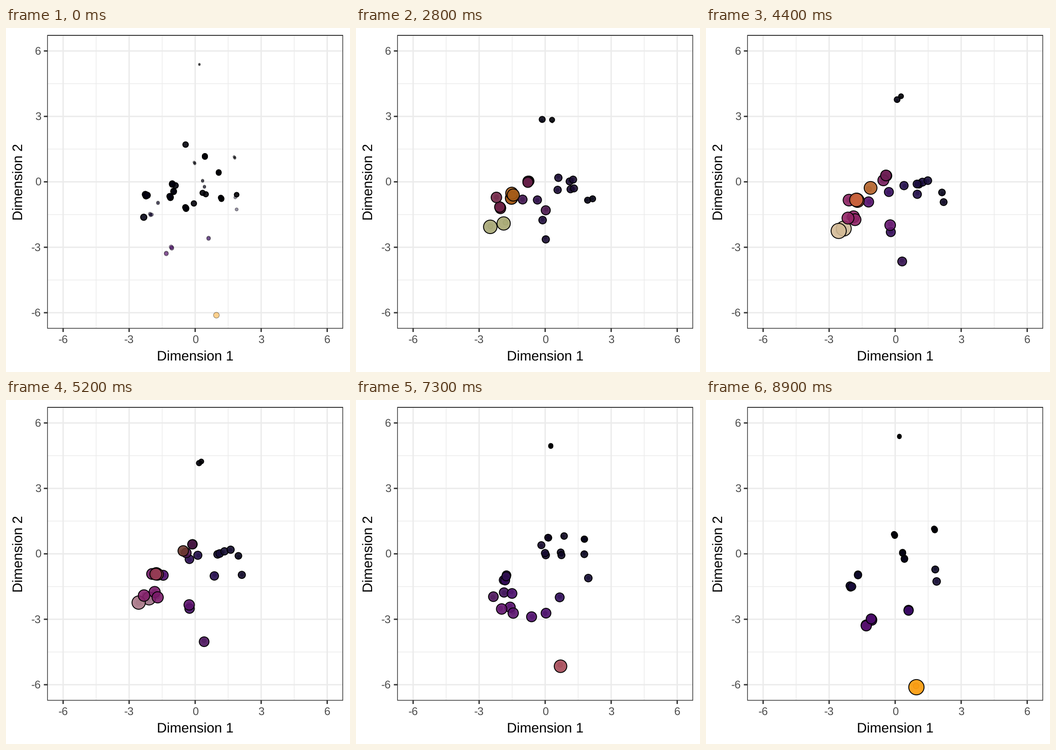
Recreate the animation shown at these times as a matplotlib script. Size 748x748 px, loop 10000 ms.

```python
import numpy as np
import matplotlib
import matplotlib.pyplot as plt
from matplotlib.animation import FuncAnimation

SIZE, DPI = 748, 100
PX = 72 / DPI                    # points per pixel
STEPS, PAUSE, FRAMES = 79, 10, 100
STROKE = 1.9
GOLDEN = np.pi * (3 - 5 ** 0.5)

plt.rcParams["font.family"] = "Liberation Sans"
plt.rcParams["text.hinting"] = "none"

# The points travel in straight lines between the hubs of four stages.
# Each route names the hub of every point, from the back dot to the front.
HUBS_1 = [(390, 253), (432, 278), (462, 313), (361, 338), (368, 342),
          (364, 354), (357, 367), (304, 363), (299, 411), (391, 391),
          (408, 381), (427, 358), (434, 361), (468, 370), (501, 362)]
ROUTE_1 = "jijkmnhhhhgggdjedffbcclnonab"

# Here the third number is the level, as it follows no simple slope
HUBS_2 = [(288, 440, 1), (422, 490, .34), (404, 434, .38), (402, 412, .55),
          (465, 341, .34), (318, 403, .66), (304, 370, .67), (364, 375, .51),
          (329, 370, .86), (331, 366, .86), (396, 366, .44), (379, 328, .64),
          (443, 347, .36), (476, 336, .34), (520, 375, .23), (411, 173, .2),
          (423, 162, .1)]
ROUTE_2 = "aabcdefffghiiikllljmenmnoopq"

HUBS_3 = [(326, 425), (288, 439), (436, 549), (395, 466), (444, 410),
          (337, 445), (326, 383), (400, 332), (423, 303), (456, 330),
          (496, 315), (507, 382), (425, 112)]
ROUTE_3 = "abcddeafbggggghihiihjjkkklmm"

HUBS_4 = [(348, 489), (360, 477), (457, 624), (440, 456), (314, 405),
          (330, 379), (431, 344), (410, 293), (427, 331), (497, 281),
          (498, 368), (501, 394), (420, 78)]
ROUTE_4 = "abcbddeaeebfefghijhhigjjklmm"


def depth(y):
    return (y - y.min()) / np.ptp(y)


def stage(hubs, route, level=None):
    """Rows of x, y, level; dots sharing a hub fan out slightly."""
    hubs = np.array(hubs, float)
    x, y = hubs[:, 0], hubs[:, 1]
    levels = level(x, y) if level else hubs[:, 2]
    rows = []
    for n, name in enumerate(route):
        i, k = ord(name) - ord("a"), route[:n].count(name)
        angle = np.pi / 2 + (k - 1) * GOLDEN
        gap = 1.5 * k ** 0.5
        rows.append((x[i] + gap * np.cos(angle), y[i] + gap * np.sin(angle),
                     levels[i]))
    return rows


STAGES = np.array([
    stage(HUBS_1, ROUTE_1, lambda x, y: 0.2 - 0.0006 * (x - 300)),
    stage(HUBS_2, ROUTE_2),
    stage(HUBS_3, ROUTE_3,
          lambda x, y: 0.01 + 0.48 * depth(y) + 0.17 * (500 - x) / 200),
    stage(HUBS_4, ROUTE_4, lambda x, y: 0.01 + 0.87 * depth(y) ** 2)])
COUNT = STAGES.shape[1]

TO_XYZ = np.array([[0.4124, 0.3576, 0.1805],
                   [0.2126, 0.7152, 0.0722],
                   [0.0193, 0.1192, 0.9505]])
WHITE = TO_XYZ.sum(axis=1)


def rgb_to_lab(rgb):
    lin = np.where(rgb > 0.04045, ((rgb + 0.055) / 1.055) ** 2.4, rgb / 12.92)
    t = lin @ TO_XYZ.T / WHITE
    f = np.where(t > 0.008856, np.cbrt(t), 7.787 * t + 16 / 116)
    x, y, z = np.moveaxis(f, -1, 0)
    return np.stack([116 * y - 16, 500 * (x - y), 200 * (y - z)], axis=-1)


def lab_to_rgb(lab):
    l, a, b = np.moveaxis(lab, -1, 0)
    y = (l + 16) / 116
    f = np.stack([y + a / 500, y, y - b / 200], axis=-1)
    t = np.where(f > 0.2069, f ** 3, (f - 16 / 116) / 7.787)
    lin = np.clip((t * WHITE) @ np.linalg.inv(TO_XYZ).T, 0, 1)
    return np.where(lin > 0.0031308, 1.055 * lin ** (1 / 2.4) - 0.055,
                    12.92 * lin)


inferno = matplotlib.colormaps["inferno"]
LABS = rgb_to_lab(inferno(np.clip(STAGES[..., 2], 0, 1) ** 2)[..., :3])


def pose(step):
    """Positions, radii and fill colours at a step."""
    pos = step / STEPS * (len(STAGES) - 1)
    i = min(int(pos), len(STAGES) - 2)
    t = pos - i
    dots = STAGES[i] * (1 - t) + STAGES[i + 1] * t
    rgb = lab_to_rgb(LABS[i] * (1 - t) + LABS[i + 1] * t)
    return dots[:, :2], 3.9 + 14.5 * dots[:, 2], np.clip(rgb, 0, 1)


def with_alpha(rgb, alpha):
    return np.column_stack([rgb, np.full(len(rgb), alpha)])


fig = plt.figure(figsize=(SIZE / DPI, SIZE / DPI), dpi=DPI, facecolor="white")
ax = fig.add_axes([0, 0, 1, 1])
ax.set_xlim(-0.5, SIZE - 0.5)     # whole numbers are pixel centres
ax.set_ylim(SIZE - 0.5, -0.5)
ax.axis("off")

LEFT, RIGHT, TOP, BOTTOM = 89.8, 731.8, 15.5, 652.5
INK, GRID, GREY = "#333333", "#ebebeb", "#4d4d4d"


def px(x):
    return 410.8 + 47.85 * x


def py(y):
    return 334 - 47.43 * y


def line(xs, ys, color, width, z):
    ax.plot(xs, ys, color=color, lw=width * PX, zorder=z, snap=False,
            solid_capstyle="butt", solid_joinstyle="miter")


def label(x, y, text, size, color, ha="center", **kw):
    ax.text(x, y, text, fontsize=size * PX, color=color, ha=ha,
            va="baseline", **kw)


for v in np.arange(-6, 6.1, 1.5):
    major = v % 3 == 0
    width, z = (2.9, 2) if major else (1.45, 1)
    line([px(v)] * 2, [TOP, BOTTOM], GRID, width, z)
    line([LEFT, RIGHT], [py(v)] * 2, GRID, width, z)
    if major:
        line([px(v)] * 2, [BOTTOM, BOTTOM + 8], INK, width, z)
        line([LEFT - 8, LEFT], [py(v)] * 2, INK, width, z)
        label(px(v), 685, f"{v:.0f}", 24, GREY)
        label(75.5, py(v) + 8.5, f"{v:.0f}", 24, GREY, ha="right")
line([LEFT, RIGHT, RIGHT, LEFT, LEFT, RIGHT],
     [TOP, TOP, BOTTOM, BOTTOM, TOP, TOP], INK, 1.5, 5)
label(410.5, 723.5, "Dimension 1", 30, "black")
label(36.5, 334, "Dimension 2", 30, "black", rotation=90,
      rotation_mode="anchor")

dots = ax.scatter(np.zeros(2 * COUNT), np.zeros(2 * COUNT), zorder=4)
dots.set_linewidths([1.0 * PX] * COUNT + [STROKE * PX] * COUNT)
dots.set_edgecolors([(0, 0, 0, 0.5)] * COUNT + [(0, 0, 0, 1)] * COUNT)


def draw(frame):
    step = min(max(frame - PAUSE, 0), STEPS)
    xy, r, rgb = pose(step)
    # Faint small trail of the step before, wrapping round at the start
    trail_xy, trail_r, trail_rgb = pose(step - 1 if step else STEPS)
    radius = np.concatenate([0.96 + 0.34 * (trail_r - 0.96), r])
    dots.set_offsets(np.vstack([trail_xy, xy]))
    dots.set_sizes((2 * radius * PX) ** 2)
    dots.set_facecolors(np.vstack([with_alpha(trail_rgb, 0.45),
                                   with_alpha(rgb, 0.9)]))
    return dots,


anim = FuncAnimation(fig, draw, frames=FRAMES, interval=100, repeat=True,
                     repeat_delay=0, blit=False)
plt.show()
```
